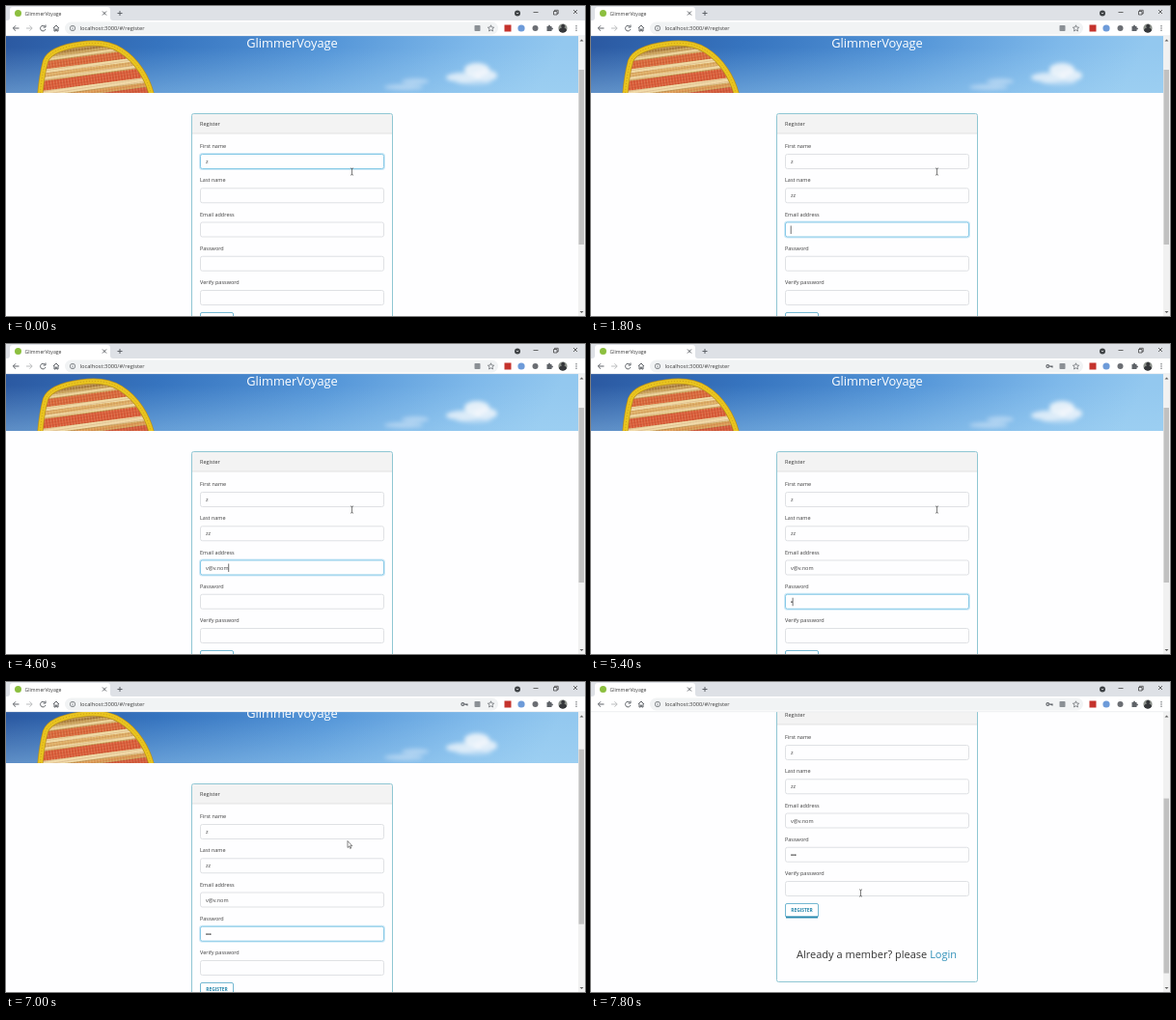
Write an HTML page that moves like this. It is 600x321 px and loops after 8 s.

```html
<!DOCTYPE html>
<html lang="en">
<head>
<meta charset="utf-8">
<title>Register</title>
<style>
html, body { margin: 0; width: 100%; height: 100%; overflow: hidden; background: #fff; }
svg { display: block; width: 100%; height: 100%; }
text { font-family: "Open Sans", "Noto Sans", sans-serif; font-size: 5.5px; fill: #3c3c3c; white-space: pre; }
.icon { fill: none; stroke: #5f6368; stroke-width: 1; }
</style>
</head>
<body>
<svg viewBox="0 0 600 321" preserveAspectRatio="none">
  <defs>
    <linearGradient id="sky" x1="0" x2="1" y1="0" y2=".08">
      <stop offset="0" stop-color="#2a569e"/><stop offset=".3" stop-color="#3674bf"/>
      <stop offset=".6" stop-color="#5596d8"/><stop offset=".85" stop-color="#7fb9ea"/><stop offset="1" stop-color="#93c8ef"/>
    </linearGradient>
    <linearGradient id="haze" x2="0" y2="1">
      <stop offset=".2" stop-color="#a9d8f5" stop-opacity="0"/><stop offset="1" stop-color="#a9d8f5" stop-opacity=".4"/>
    </linearGradient>
    <filter id="soft" x="-50%" y="-50%" width="200%" height="200%"><feGaussianBlur stdDeviation="2"/></filter>
    <pattern id="weave" width="3" height="3" patternUnits="userSpaceOnUse" patternTransform="rotate(-9)">
      <path d="M.5 0V3" stroke="#fff0c0" stroke-opacity=".2"/><path d="M0 .5H3" stroke="#7a2c10" stroke-opacity=".14"/>
    </pattern>
    <clipPath id="view"><rect y="31" width="593" height="290"/></clipPath>
    <clipPath id="heroBox"><rect y="0" width="593" height="90"/></clipPath>
    <clipPath id="sole"><path id="solePath" d="M35 96C36 82 38 68 41 57C45 47 59 42 78 39.5C95 37 108 39 119 46C135 56 147 74 152 96Z"/></clipPath>
  </defs>

  <rect width="600" height="321" fill="#fefeff"/>
  <g clip-path="url(#view)">
    <g id="page">
      <g clip-path="url(#heroBox)">
        <rect width="593" height="90" fill="url(#sky)"/>
        <rect y="31" width="593" height="59" fill="url(#haze)"/>
        <g filter="url(#soft)" fill="#f4f8fc">
          <ellipse cx="488" cy="66" rx="13" ry="7" opacity=".85"/>
          <ellipse cx="497" cy="72" rx="12" ry="6" opacity=".8"/>
          <ellipse cx="474" cy="74" rx="18" ry="5" opacity=".75"/>
          <ellipse cx="485" cy="79" rx="18" ry="3" opacity=".4"/>
          <ellipse cx="424" cy="78" rx="14" ry="3" opacity=".4"/>
          <ellipse cx="412" cy="84" rx="20" ry="3" opacity=".4"/>
        </g>
        <g clip-path="url(#sole)">
          <rect x="30" y="31" width="130" height="75" fill="#c8a05a"/>
          <g id="bands"></g>
          <rect x="30" y="31" width="130" height="75" fill="url(#weave)"/>
        </g>
        <use href="#solePath" fill="none" stroke="#b8901c" stroke-width="6"/>
        <use href="#solePath" fill="none" stroke="#e9c41f" stroke-width="4.600"/>
        <use href="#solePath" fill="none" stroke="#c99b12" stroke-width=".8" stroke-dasharray="1 2"/>
      </g>
      <text x="296.500" y="42.600" text-anchor="middle" style="font-size:12.8px;font-weight:500;fill:#fff">GlimmerVoyage</text>
      <rect x="192.500" y="111.500" width="208" height="287" rx="2" fill="#fefeff"/>
      <path d="M193 132V113.500Q193 112 194.500 112H398.500Q400 112 400 113.500V132Z" fill="#f3f3f3"/>
      <path d="M193 132H400" stroke="#dcdcdc" stroke-width=".8"/>
      <rect x="192.500" y="111.500" width="208" height="287" rx="2" fill="none" stroke="#8fc6d3"/>
      <text x="201" y="123.500">Register</text>
      <g id="form"></g>
      <rect x="201.500" y="317.500" width="34" height="14" rx="1.500" fill="#fff" stroke="#74b8d2"/>
      <path d="M202 331.500H235" stroke="#2588ad" stroke-width="1.800"/>
      <text x="218.500" y="326" text-anchor="middle" style="font-size:4.9px;font-weight:700;fill:#2587ac">REGISTER</text>
      <text x="213" y="374" style="font-size:11px;fill:#333">Already a member? please <tspan fill="#2d8fb8">Login</tspan></text>
    </g>
  </g>

  <rect x="593" y="31" width="7" height="290" fill="#f1f1f1"/>
  <path d="M594.500 36.500L596.500 34.500L598.500 36.500ZM594.500 316L596.500 318L598.500 316Z" fill="#606060"/>
  <rect id="thumb" x="593.500" y="66" width="5.500" height="181" fill="#c1c1c1"/>

  <rect width="600" height="15" fill="#dee1e6"/>
  <path d="M1 15Q4 15 4 12V4Q4 1 7 1H105Q108 1 108 4V12Q108 15 111 15Z" fill="#fff"/>
  <circle cx="12.500" cy="7.500" r="3.500" fill="#8cbf3f"/>
  <text x="19.500" y="9.500" style="font-size:5.150px">GlimmerVoyage</text>
  <path class="icon" d="M100 5.500L104 9.500M104 5.500L100 9.500M115.500 7.500H120.500M118 5V10"/>
  <circle cx="530" cy="7.500" r="3" fill="#3c4043"/>
  <path d="M528.800 6.900L530 8.100L531.200 6.900" fill="none" stroke="#fff" stroke-width=".7"/>
  <path d="M546.500 6.500H551.500M567.500 5.500H571V9H567.500ZM568.500 5.500V4.300H572.200V8H571M588 4L592 8M592 4L588 8" fill="none" stroke="#333" stroke-width=".7"/>

  <rect y="15" width="600" height="16" fill="#fff"/>
  <path d="M0 30.700H600" stroke="#e2e4e7" stroke-width=".6"/>
  <rect x="61" y="16.500" width="449" height="13" rx="6.500" fill="#f1f3f4"/>
  <g class="icon">
    <path d="M13.500 23H7.500M10 20.300L7.300 23L10 25.700"/>
    <path d="M21 23H27M24.500 20.300L27.200 23L24.500 25.700" stroke="#babcbe"/>
    <path d="M40.400 21.200A2.800 2.800 0 1 0 41 24M41 19.500V22H38.500"/>
    <path d="M49 23L52 20L55 23M50 22.500V26H51.300V24H52.700V26H54V22.500"/>
    <circle cx="69" cy="23" r="2.700" stroke-width=".7"/><path d="M69 22.500V24.500M69 21.200V21.800" stroke-width=".7"/>
    <path d="M502.500 19.800L503.400 22L505.700 22.200L504 23.700L504.500 26L502.500 24.800L500.500 26L501 23.700L499.300 22.200L501.600 22Z" stroke-width=".7"/>
    <path id="key" d="M475 23H478V24.500M476.700 23V24" stroke-width="1.200"/>
  </g>
  <circle id="keyRing" cx="473.300" cy="23" r="1.400" fill="none" stroke="#5f6368" stroke-width="1.100"/>
  <text x="76.500" y="25" style="font-size:5.750px">localhost:3000/#/register</text>
  <rect x="485.500" y="20" width="6" height="6" rx=".8" fill="#8b9095"/>
  <rect x="516.500" y="19.500" width="7" height="7" fill="#c5332d"/>
  <circle cx="534" cy="23" r="3.600" fill="#6d9bd9"/>
  <circle cx="548.500" cy="23" r="3" fill="#6b6e73"/>
  <path d="M560.500 21H562Q562 19.500 563 19.500T564 21H565.500V22.500Q567 22.500 567 23.500T565.500 24.500V26H560.500Z" fill="#5f6368"/>
  <circle cx="577" cy="23" r="4.600" fill="#8b908a"/>
  <path d="M572.800 25Q574 22.500 576 22.500A2 2 0 1 1 578.500 22.500Q580.500 23 581.200 25A4.600 4.600 0 0 1 572.800 25Z" fill="#35373a"/>
  <g fill="#5f6368"><circle cx="591" cy="20.700" r=".7"/><circle cx="591" cy="23" r=".7"/><circle cx="591" cy="25.300" r=".7"/></g>

  <path id="beam" d="M-1.500 -3.500H-.5L0 -3L.5 -3.500H1.500M0 -3V3M-1.500 3.500H-.5L0 3L.5 3.500H1.500" fill="none" stroke="#444" stroke-width=".7"/>
  <path id="arrow" d="M0 0V7L1.600 5.500L2.700 8L3.700 7.500L2.600 5.200H4.800Z" fill="#fff" stroke="#333" stroke-width=".6"/>
</svg>
<script>
const LOOP = 8000, TICK = 200, ROW = 35.25;
const el = id => document.getElementById(id);
const make = (parent, tag, attrs, content = '') => {
  const node = document.createElementNS('http://www.w3.org/2000/svg', tag);
  for (const name in attrs) node.setAttribute(name, attrs[name]);
  node.textContent = content;
  return parent.appendChild(node);
};
const show = (node, on) => node.setAttribute('visibility', on ? 'visible' : 'hidden');
const latest = (list, t) => list.reduce((found, entry) => entry[0] <= t ? entry : found);

// Woven stripes: [top at left edge, height, colour]
[[50, 2, '#a67a3c'], [55, 3, '#ead39a'], [59, 8, '#d9663a'], [67, 4, '#f0d9a4'], [71, 4, '#dfae66'],
 [75, 3, '#efd6a0'], [79, 10, '#da5a38'], [89, 5, '#f0d9a8'], [95, 3, '#dd9a55'], [99, 9, '#d3573a']]
  .forEach(([y, h, fill]) => make(el('bands'), 'path', { d: `M30 ${y}L160 ${y - 17}v${h}L30 ${y + h}Z`, fill }));

const rows = ['First name', 'Last name', 'Email address', 'Password', 'Verify password'].map((label, i) => {
  const g = make(el('form'), 'g', { transform: `translate(0 ${i * ROW})` });
  make(g, 'text', { x: 201, y: 147.2 }, label);
  const box = { x: 201.5, y: 153.5, width: 190, height: 15, rx: 2 };
  const glow = make(g, 'rect', { ...box, fill: 'none', stroke: '#d0eaf7', 'stroke-width': 3 });
  const frame = make(g, 'rect', { ...box, fill: '#fefeff', 'stroke-width': .9 });
  const value = make(g, 'text', { x: 207, y: 163, style: 'fill:#444' });
  const dots = [0, 1, 2].map(n => make(g, 'circle', { cx: 208 + n * 1.9, cy: 161.4, r: .8, fill: '#444' }));
  return { glow, frame, value, dots };
});
const caret = make(el('form'), 'path', { d: 'M0 157V165.500', stroke: '#333', 'stroke-width': .7 });

// [time, focused row, its value or number of dots, caret shown]
const typing = [
  [0, 0, 'z', 0],
  [600, 1, '', 1], [1000, 1, 'z', 1], [1200, 1, 'zz', 1], [1400, 1, 'zz', 0],
  [1800, 2, '', 1], [2200, 2, 'v', 1], [2600, 2, 'v', 0], [2800, 2, 'v@', 1], [3400, 2, 'v@', 0],
  [3800, 2, 'v@v', 1], [4200, 2, 'v@v.', 1], [4400, 2, 'v@v.no', 1], [4600, 2, 'v@v.nom', 1],
  [4800, 3, 0, 1], [5400, 3, 1, 1], [5600, 3, 2, 1], [5800, 3, 3, 1], [6000, 3, 3, 0],
  [6200, 3, 3, 1], [6600, 3, 3, 0], [7800, -1, 0, 0]
];
const scrolling = [[0, 0], [7000, 6], [7200, 68], [7400, 88]];
// [time, x, y, arrow]
const pointer = [
  [0, 358.5, 171.5, 0], [6600, 357, 171, 0], [6800, 355, 167, 1], [7000, 354, 164.5, 1],
  [7200, 352, 166, 1], [7400, 315, 195, 0], [7600, 281, 216, 0], [7800, 279.5, 218.5, 0]
];

function render(time) {
  const t = Math.floor(time % LOOP / TICK) * TICK;
  const [, focus, , caretOn] = latest(typing, t);
  rows.forEach((row, i) => {
    const entries = typing.filter(e => e[0] <= t && e[1] === i);
    const value = entries.length ? entries[entries.length - 1][2] : '';
    row.value.textContent = i === 3 ? '' : value;
    row.dots.forEach((dot, n) => show(dot, i === 3 && n < value));
    const active = i === focus;
    show(row.glow, active);
    row.frame.setAttribute('stroke', active ? '#7cc5e5' : '#dcdee1');
    if (active) {
      const width = i === 3 ? value * 1.9 : value ? row.value.getComputedTextLength() : 0;
      caret.setAttribute('transform', `translate(${207.2 + width} ${i * ROW})`);
    }
  });
  show(caret, caretOn);
  show(el('key'), t >= 5400);
  show(el('keyRing'), t >= 5400);

  const offset = latest(scrolling, t)[1];
  el('page').setAttribute('transform', `translate(0 ${-offset})`);
  el('thumb').setAttribute('y', 66 + offset * .62);

  const [, x, y, isArrow] = latest(pointer, t);
  for (const id of ['beam', 'arrow']) {
    el(id).setAttribute('transform', `translate(${x} ${y})`);
    show(el(id), (id === 'arrow') === !!isArrow);
  }
}

const start = performance.now();
(function loop() {
  render(performance.now() - start);
  requestAnimationFrame(loop);
})();
</script>
</body>
</html>
```
